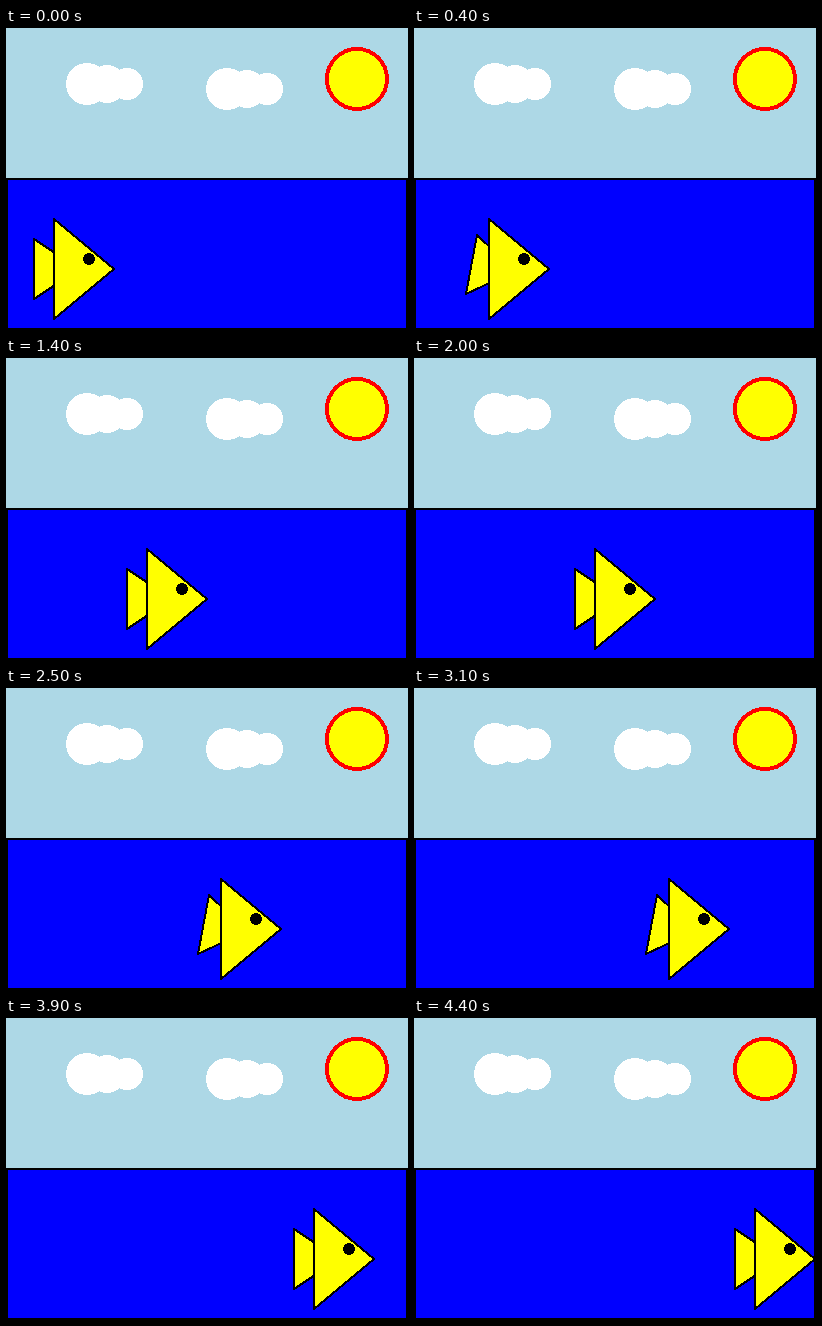
Write an HTML page that moves like this. It is 402 px wide and 302 px high and loops after 4.6 s.

```html
<!DOCTYPE html>
<html lang="en">
<head>
<meta charset="utf-8">
<title>Swimming fish</title>
<style>
  html, body { margin: 0; width: 100%; height: 100%; overflow: hidden; background: #add8e6; }
  svg { display: block; shape-rendering: crispEdges; }
  .fish polygon { fill: #ff0; stroke: #000; stroke-width: 2; stroke-linejoin: round; }
</style>
</head>
<body>
<svg width="402" height="302" viewBox="0 0 402 302">
  <defs>
    <g id="cloud" fill="#fff">
      <circle r="21"/>
      <circle cx="20" r="19"/>
      <circle cx="40" r="16"/>
    </g>
  </defs>
  <rect width="402" height="302" fill="#add8e6"/>
  <use href="#cloud" x="81" y="56"/>
  <use href="#cloud" x="221" y="61"/>
  <circle cx="351" cy="51" r="30" fill="#ff0" stroke="#f00" stroke-width="4"/>
  <rect x="1" y="151" width="400" height="150" fill="#00f" stroke="#000" stroke-width="2"/>
  <g class="fish" id="fish">
    <polygon id="tail"/>
    <polygon points="0,191 60,241 0,291"/>
    <circle cx="35" cy="231" r="6"/>
  </g>
</svg>
<script>
  const LOOP = 4600, STEP = 100, LAST = 44;
  const START = 48, SPEED = 20 / 3; // pixels per step
  const TAIL_REST = "-20,211 25,241 -20,271";
  const TAIL_FLICK = "-12,207 26,243 -23,266";

  const fish = document.getElementById("fish");
  const tail = document.getElementById("tail");
  const begin = performance.now();

  function draw(time) {
    const n = Math.min(LAST, Math.floor((time % LOOP) / STEP));
    const x = START + Math.round(n * SPEED);
    fish.setAttribute("transform", `translate(${x} 0)`);
    // one tail flick per 20 pixels
    tail.setAttribute("points", n % 3 === 1 ? TAIL_FLICK : TAIL_REST);
  }

  function tick() {
    draw(performance.now() - begin);
    requestAnimationFrame(tick);
  }

  draw(0);
  requestAnimationFrame(tick);
</script>
</body>
</html>
```
